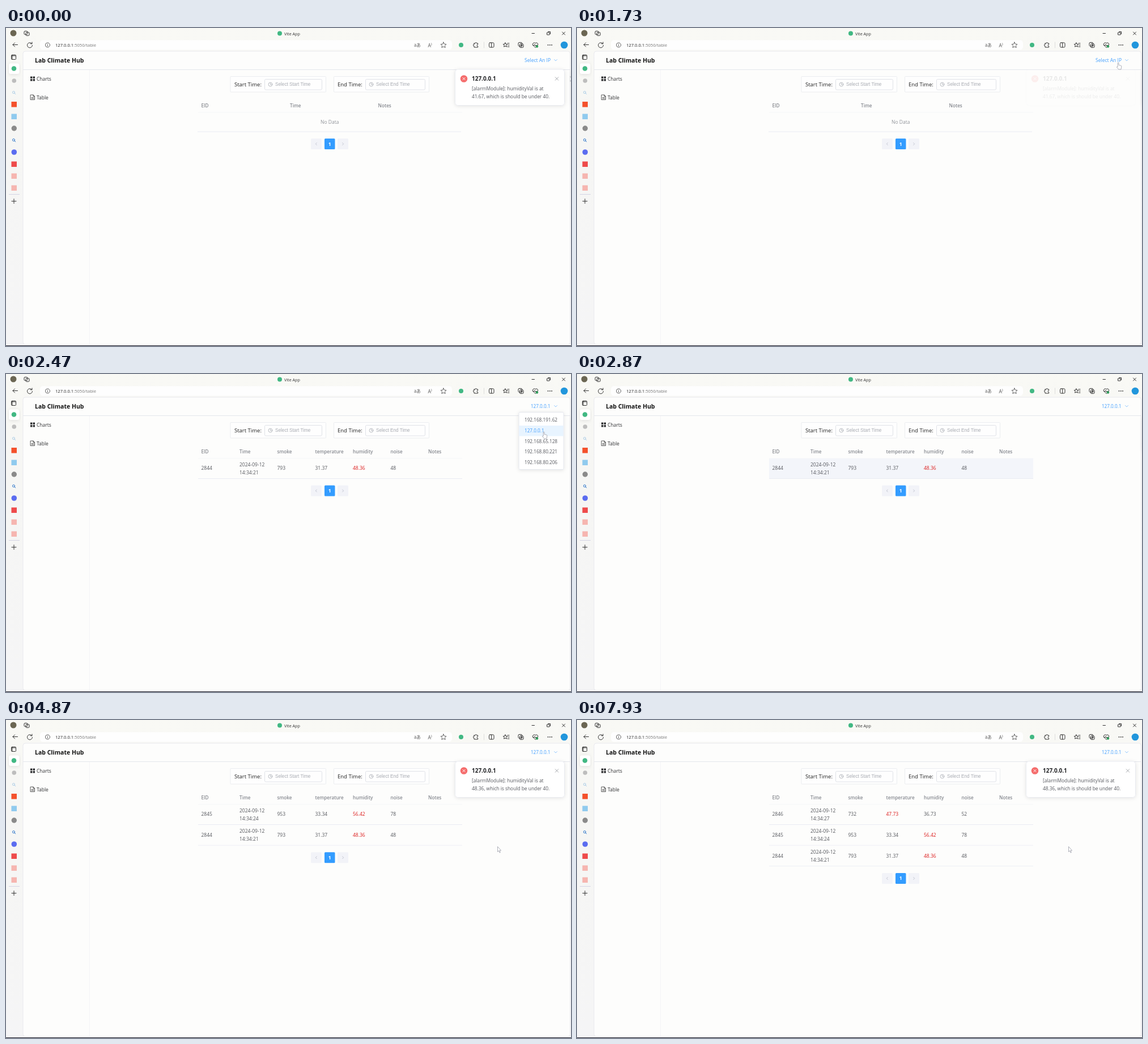
Write an HTML page that moves like this. It is 997 px wide and 561 px high and loops after 8 s.

```html
<!DOCTYPE html>
<html lang="en">
<head>
<meta charset="utf-8">
<title>Sensor table</title>
<style>
html, body { margin: 0; width: 100%; height: 100%; overflow: hidden; background: #fdfdfc; }
svg { display: block; width: 100vw; height: 100vh; }
text { font-family: "Open Sans", "Noto Sans", sans-serif; font-size: 8.5px; fill: #56585e; white-space: pre; }
.icon { fill: none; stroke: #333; stroke-width: 1; stroke-linecap: round; stroke-linejoin: round; }
.side { fill: #303133; }
.brand { font-size: 10.5px; font-weight: 700; fill: #111; }
.label { font-size: 9.5px; fill: #222; }
.hint { font: 8.2px "Liberation Sans", Arial, sans-serif; fill: #a8abb2; }
.head text { font-size: 8.2px; font-weight: 600; fill: #85888f; }
.high { fill: #dc1c1c; }
.menu text { font-size: 8.2px; }
.blue, .menu .blue { fill: #409eff; }
.message { font-size: 8.4px; }
.name { font-size: 10px; font-weight: 700; fill: #222326; }
.line { stroke: #e9ebf3; }

/* Everything shares one 8 s clock. */
.empty, .filled, .pager, .r1, .r2, .r3, .hover, .old, .new, .menu, .pick, .cursor, .arrow, .hand {
  animation: 8s linear infinite;
}
.empty { animation-name: empty; }
.filled { animation-name: filled; }
.pager { animation-name: pager; }
.r1 { animation-name: r1; }
.r2 { animation-name: r2; }
.r3 { animation-name: r3; }
.hover { animation-name: hover; }
.old { animation-name: leave; }
.new { animation-name: enter; }
.menu { animation-name: menu; transform-origin: 945px 67px; }
.pick { animation-name: pick; }
.cursor { animation-name: cursor; }
.arrow { animation-name: arrow; }
.hand { animation-name: hand; }

@keyframes empty { 0%, 29.5% { opacity: 1; } 29.501%, 100% { opacity: 0; } }
@keyframes filled { 0%, 29.5% { opacity: 0; } 29.501%, 100% { opacity: 1; } }
@keyframes pager {
  0%, 29.5% { transform: translateY(-1.5px); }
  29.501%, 57.5% { transform: none; }
  57.501%, 95% { transform: translateY(36.7px); }
  95.001%, 100% { transform: translateY(73.4px); }
}
@keyframes r1 {
  0%, 57.5% { transform: none; }
  57.501%, 95% { transform: translateY(36.7px); }
  95.001%, 100% { transform: translateY(73.4px); }
}
@keyframes r2 {
  0%, 57.5% { opacity: 0; transform: none; }
  57.501%, 95% { opacity: 1; transform: none; }
  95.001%, 100% { opacity: 1; transform: translateY(36.7px); }
}
@keyframes r3 { 0%, 95% { opacity: 0; } 95.001%, 100% { opacity: 1; } }
@keyframes hover { 0%, 33.2% { opacity: 0; } 35%, 37% { opacity: 1; } 40%, 100% { opacity: 0; } }
@keyframes leave {
  0%, 19.3% { opacity: 1; animation-timing-function: ease; }
  23%, 100% { opacity: 0; }
}
@keyframes enter {
  0%, 36.9% { transform: translateX(206px); animation-timing-function: ease; }
  40.6%, 100% { transform: none; }
}
@keyframes menu {
  0%, 23% { opacity: 0; transform: scaleY(0); animation-timing-function: ease; }
  26.5%, 31.5% { opacity: 1; transform: none; animation-timing-function: ease; }
  34.5%, 100% { opacity: 0; transform: scaleY(0); }
}
@keyframes pick { 0%, 27.4% { opacity: 0; } 27.401%, 100% { opacity: 1; } }
@keyframes cursor {
  0% { transform: translate(995px, 84px); animation-timing-function: ease-out; }
  5.6% { transform: translate(880px, 274px); }
  11.6% { transform: translate(905px, 187px); animation-timing-function: ease-out; }
  18.5%, 24.5% { transform: translate(955px, 61px); animation-timing-function: ease-in-out; }
  28.8%, 31.2% { transform: translate(949px, 102px); animation-timing-function: ease-in-out; }
  35% { transform: translate(790px, 166px); }
  37.5% { transform: translate(768px, 176px); animation-timing-function: ease-out; }
  41.2%, 44.1% { transform: translate(758px, 226.5px); animation-timing-function: ease-in-out; }
  52.5%, 100% { transform: translate(867px, 223px); }
}
@keyframes arrow {
  0%, 17.8% { opacity: 1; }
  17.801%, 32% { opacity: 0; }
  32.001%, 34.8% { opacity: 1; }
  34.801%, 37.3% { opacity: 0; }
  37.301%, 100% { opacity: 1; }
}
@keyframes hand { 0%, 17.8% { opacity: 0; } 17.801%, 32% { opacity: 1; } 32.001%, 100% { opacity: 0; } }
</style>
</head>
<body>
<svg viewBox="0 0 997 561" preserveAspectRatio="none">
  <defs>
    <linearGradient id="chrome" x2="0" y2="1">
      <stop offset="0" stop-color="#f9f9f5"/>
      <stop offset=".3" stop-color="#f6f6f4"/>
      <stop offset="1" stop-color="#f5f5f6"/>
    </linearGradient>
    <filter id="soft" x="-10%" y="-20%" width="120%" height="150%">
      <feDropShadow dx="0" dy="1" stdDeviation="3" flood-color="#000" flood-opacity=".1"/>
    </filter>
    <g id="clock" class="icon" style="stroke:#a8abb2;stroke-width:.8"><circle r="3.4"/><path d="M0-2V.3H1.8"/></g>
    <g id="lens"><circle cx="-.5" cy="-.5" r="2"/><path d="M1 1 2.8 2.8"/></g>
    <g id="alert">
      <rect x="792.5" y="73" width="193" height="63.5" rx="5" fill="#fff" stroke="#e9ebf0" filter="url(#soft)"/>
      <circle cx="808" cy="89.5" r="6.3" fill="#f56c6c"/>
      <path d="m806 87.5 4 4m0-4-4 4" class="icon" style="stroke:#fff"/>
      <path d="m969.2 86.7 5.500 5.500m0-5.500-5.500 5.500" class="icon" style="stroke:#909399;stroke-width:.8"/>
      <text class="name" x="822" y="93">127.0.0.1</text>
      <text class="message" x="822" y="109.5">[alarmModule]: humidityVal is at</text>
    </g>
  </defs>

  <!-- browser -->
  <rect width="997" height="561" fill="url(#chrome)"/>
  <rect x="60" y="21.5" width="727" height="17" rx="5" fill="#fefefe"/>
  <rect x="30" y="41" width="965.5" height="517.5" rx="4" fill="#fdfdfc" stroke="#e9e9ee"/>
  <path d="M0 560.5H997" stroke="#1c1c28"/>
  <circle cx="13" cy="9" r="5.5" fill="#6b6653"/>
  <g class="icon">
    <rect x="32" y="5.5" width="6" height="6" rx="1.5"/><rect x="35" y="7.5" width="6" height="6" rx="1.5"/>
    <path d="M928 9.5h4.5M955 8h4v4h-4zM956.5 6.5h4v4M981.500 7l5 5m0-5-5 5"/>
    <path d="M20.500 29.500h-8.500m3.500-3.500-3.500 3.500 3.500 3.500M45.500 27.500a4.500 4.500 0 1 0 1 3M46 25v2.800h-2.800"/>
    <g stroke="#666"><circle cx="73.5" cy="30" r="4"/><path d="M73.500 29.500V32M73.500 28v.1"/></g>
    <path d="m772 25 1.500 3.300 3.500.4-2.600 2.400.8 3.500-3.200-1.800-3.200 1.800.8-3.500-2.600-2.400 3.500-.4z" stroke="#666"/>
    <path d="M826 27h2a1.300 1.300 0 0 1 2.600 0h2v2a1.500 1.500 0 0 0 0 3v2h-6.600v-2.300a1.500 1.500 0 0 1 0-3z"/>
    <path d="M843.500 25v10" stroke="#ddd"/>
    <rect x="852.5" y="26" width="8.5" height="8" rx="1.5"/><path d="M856.700 26v8"/>
    <path d="m881 26 1.200 2.300 2.500.4-1.800 1.800.4 2.700-2.300-1.300-2.300 1.300.4-2.700-1.800-1.800 2.500-.4zM885 27h3m-2 3h2m-3 3h3"/>
    <rect x="904" y="25.5" width="6.5" height="6.5" rx="1.5"/><rect x="906.5" y="28" width="6.5" height="6.5" rx="1.5"/><path d="M909.700 29.500v3.500m-1.700-1.800h3.500"/>
    <path d="m934 34.500-4-4a2.500 2.500 0 0 1 4-3.500 2.500 2.500 0 0 1 4 3.500zM930 30.500h2l1-1.500 1.500 3 1-1.500h2"/>
  </g>
  <circle cx="937" cy="32.5" r="2.2" fill="#2e9e5b"/>
  <g fill="#333"><circle cx="956.5" cy="30" r=".9"/><circle cx="959.8" cy="30" r=".9"/><circle cx="963" cy="30" r=".9"/></g>
  <circle cx="985" cy="30" r="6.3" fill="#2196dc"/>
  <g fill="#41b883"><circle cx="483" cy="9.5" r="4"/><circle cx="803" cy="30" r="4"/></g>
  <text x="491" y="12.5" style="font-size:7.2px;fill:#333">Vite App</text>
  <text x="87" y="32.8" style="font-size:7.6px;fill:#777"><tspan fill="#222">127.0.0.1</tspan>:5050/table</text>
  <text x="720" y="32.5" style="font:7.5px 'Noto Sans CJK JP','Noto Sans CJK',sans-serif;fill:#555">aあ</text>
  <text x="744.5" y="33.5" style="fill:#555">A⁾</text>

  <!-- side strip -->
  <rect x="5" y="62.5" width="18.5" height="18.5" rx="4" fill="#fff" filter="url(#soft)"/>
  <circle cx="14" cy="71.5" r="4.3" fill="#41b883"/>
  <rect x="9.5" y="47.5" width="8" height="8" rx="1" class="icon"/><path d="M11 48v7M10 49h7" class="icon"/>
  <circle cx="14.3" cy="93" r="3.8" fill="#bdbdbd"/>
  <use href="#lens" x="14" y="114" class="icon" style="stroke:#a9cbe6"/>
  <rect x="9.5" y="130" width="9.5" height="9.5" fill="#f4512c"/>
  <rect x="9.5" y="151.5" width="9.5" height="9.5" fill="#90caee"/>
  <circle cx="14.3" cy="177" r="4.7" fill="#8a8a8a"/>
  <use href="#lens" x="14" y="198" class="icon" style="stroke:#2872c8"/>
  <circle cx="14.3" cy="219" r="4.8" fill="#5b6cf0"/>
  <rect x="9.5" y="235.5" width="9.5" height="9.5" fill="#ee4b4b"/>
  <g fill="#f6b5b0"><rect x="9.5" y="256.5" width="9.5" height="9.5"/><rect x="9.5" y="277.5" width="9.5" height="9.5"/></g>
  <path d="M5 293.500H24" stroke="#d4d4e4"/>
  <path d="M10 305.500h8m-4-4v8" class="icon"/>

  <!-- page -->
  <path d="M30 73.500H995" stroke="#e4e6ec"/>
  <path d="M147.500 74V558" stroke="#f4f4f6"/>
  <text class="brand" x="51" y="61">Lab Climate Hub</text>
  <path d="M43 85.500h3.400v3.400H43zm4.600 0H51v3.400h-3.400zM43 90.100h3.400v3.400H43zm4.600 0H51v3.400h-3.400z" class="side"/>
  <path d="M43.500 118h4.500l2.500 2.500v6h-7zM48 118v2.500h2.500M45 122.500h4m-4 2h4" class="icon" style="stroke-width:.8"/>
  <text class="side" x="54" y="93">Charts</text>
  <text class="side" x="54" y="125.5">Table</text>
  <g fill="#fefefe" stroke="#ebedf0">
    <rect x="396" y="85.5" width="168.5" height="27.5" rx="1"/><rect x="578.5" y="85.5" width="168" height="27.5" rx="1"/>
    <g stroke="#e0e2e8"><rect x="456.5" y="90.5" width="101" height="18.5" rx="2"/><rect x="634.5" y="90.5" width="105" height="18.5" rx="2"/></g>
  </g>
  <text class="label" x="403" y="103">Start Time:</text>
  <text class="label" x="585" y="103">End Time:</text>
  <use href="#clock" x="466.5" y="99.5"/><use href="#clock" x="644.5" y="99.5"/>
  <text class="hint" x="475" y="102.3">Select Start Time</text>
  <text class="hint" x="653" y="102.3">Select End Time</text>

  <!-- table -->
  <path class="line" d="M339 149H805" opacity=".4"/>
  <g class="empty">
    <g class="head"><text x="344.5" y="139.8">EID</text><text x="501" y="139.8">Time</text><text x="656.5" y="139.8">Notes</text></g>
    <text x="555" y="169" style="fill:#909399">No Data</text>
    <path class="line" d="M338 183H803"/>
  </g>
  <g class="filled">
    <g class="head">
      <text x="344.5" y="139.8">EID</text><text x="412" y="139.8">Time</text><text x="478.5" y="139.8">smoke</text>
      <text x="545.5" y="139.8">temperature</text><text x="612" y="139.8">humidity</text><text x="678.5" y="139.8">noise</text><text x="745" y="139.8">Notes</text>
    </g>
    <rect class="hover" x="339" y="149" width="466" height="35.5" fill="#f3f5fa"/>
    <g id="rows"></g>
  </g>
  <g class="pager">
    <rect x="538" y="196.5" width="19" height="19" rx="1.5" fill="#f2f3f8"/><rect x="585" y="196.5" width="19" height="19" rx="1.5" fill="#f2f3f8"/>
    <rect x="562" y="196.5" width="18.5" height="19" rx="1.5" fill="#339cff"/>
    <path d="m548.300 204-2 2 2 2m45.400-4 2 2-2 2" class="icon" style="stroke:#b4b8c4;stroke-width:.8"/>
    <text x="571.2" y="209" text-anchor="middle" style="fill:#fff;font-weight:700">1</text>
  </g>

  <!-- address picker -->
  <text class="blue empty" x="961" y="60.2" text-anchor="end">Select An IP</text>
  <text class="blue filled" x="960.5" y="60.2" text-anchor="end" style="font-size:8.2px">127.0.0.1</text>
  <path d="m967.500 55.500 2.500 2.500 2.500-2.500" class="icon" style="stroke:#79bbff;stroke-width:.8"/>
  <g class="menu">
    <rect x="905" y="67.5" width="79" height="101" rx="2" fill="#fff" stroke="#e4e7ed" filter="url(#soft)"/>
    <text x="915" y="84">192.168.191.62</text>
    <text x="915" y="102.7">127.0.0.1</text>
    <text x="915" y="121.5">192.168.65.128</text>
    <text x="915" y="140.2">192.168.80.221</text>
    <text x="915" y="159">192.168.80.206</text>
    <g class="pick"><rect x="905.5" y="91" width="78" height="18.5" fill="#e8f4ff"/><text class="blue" x="915" y="102.7">127.0.0.1</text></g>
  </g>

  <g class="old"><use href="#alert"/><text class="message" x="822" y="123.5">41.67, which is should be under 40.</text></g>
  <g class="new"><use href="#alert"/><text class="message" x="822" y="123.5">48.36, which is should be under 40.</text></g>

  <g class="cursor" fill="#fff" stroke="#8e919c" stroke-width=".7" stroke-linejoin="round">
    <path class="arrow" d="M.5.300V9.500L2.500 7.600 4 11.200 5.300 10.600 3.900 7.200H6.600Z"/>
    <path class="hand" d="M-.8 7.500V1a.9.900 0 0 1 1.800 0V4.500l4 .8q1 .4.800 1.700L5 12H.8L-2.700 8q.5-1.400 1.900-.5Z"/>
  </g>
</svg>
<script>
const columns = [344.5, 412, 478.5, 545.5, 612, 678.5];
const readings = [
  ["r1", 2844, "14:34:21", 793, "31.37", "48.36", 48],
  ["r2", 2845, "14:34:24", 953, "33.34", "56.42", 78],
  ["r3", 2846, "14:34:27", 732, "47.73", "36.73", 52]
];
const limits = { 3: 40, 4: 40 };

const cell = (value, col, y = 169.3) =>
  `<text x="${columns[col]}" y="${y}"${value > limits[col] ? ' class="high"' : ""}>${value}</text>`;

const row = ([name, id, time, ...values]) =>
  `<g class="${name}">` +
  cell(id, 0) + cell("2024-09-12", 1, 162.7) + cell(time, 1, 176.5) +
  values.map((value, i) => cell(value, i + 2)).join("") +
  `<path class="line" d="M339 184.5H805"/></g>`;

document.getElementById("rows").innerHTML = readings.map(row).join("");
</script>
</body>
</html>
```
